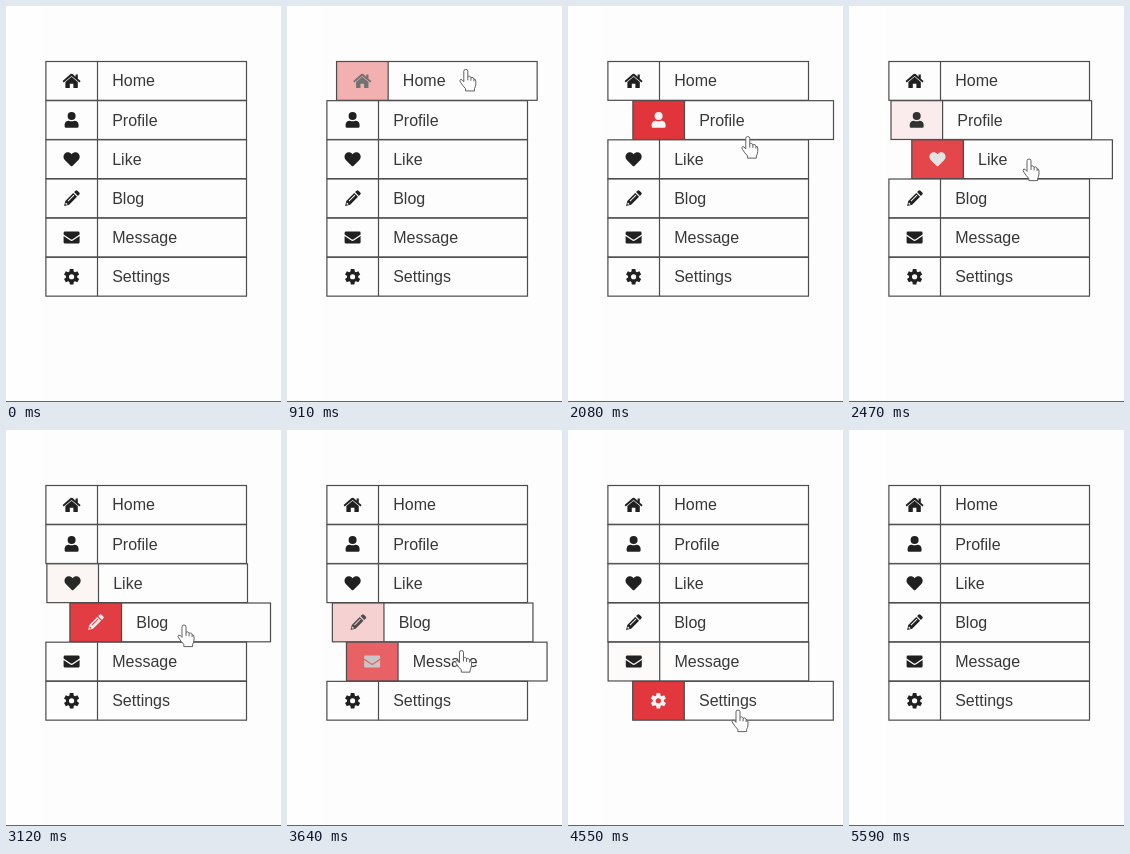
An HTML page with a canvas that plays this animation: 275 px wide and 396 px high, repeating every 6.5 s.

```html
<!DOCTYPE html>
<html lang="en">
<head>
<meta charset="utf-8">
<title>Hover menu</title>
<style>
  html, body { margin: 0; width: 100%; height: 100%; overflow: hidden; background: #fefefe; }
  canvas { display: block; width: 275px; height: 396px; }
</style>
</head>
<body>
<canvas id="stage"></canvas>
<script>
const W = 275, H = 396, LOOP = 6500, STEP = 130;
const PAPER = [252, 253, 252], RED = [225, 53, 59], DARK = [32, 32, 32], LIGHT = [245, 245, 245];
const ROW = { x: 39.9, y: 55.5, w: 200.6, h: 38.8, pitch: 39.17, split: 51.6, slide: 25 };
const FADE = 500;

const canvas = document.getElementById('stage');
const ctx = canvas.getContext('2d');
const dpr = window.devicePixelRatio || 1;
canvas.width = W * dpr;
canvas.height = H * dpr;

// Icons are centred on the origin, about 16 units across.
const icons = {
  home: new Path2D('M-9 .2L-1 -6.8Q0 -7.6 1 -6.8L4 -4.2V-6.5H6.2V-2.2L9 .2L7.9 1.6L0 -5L-7.9 1.6Z' +
    'M0 -4.2L6.2 1.1V6.6Q6.2 7.2 5.6 7.2H1.8V2.8H-1.8V7.2H-5.6Q-6.2 7.2 -6.2 6.6V1.1Z'),
  user: new Path2D('M0 -8A4 4 0 0 1 0 0A4 4 0 0 1 0 -8Z' +
    'M-2.8 .6Q0 1.6 2.8 .6Q7 .8 7 5V6.3Q7 7.8 5.5 7.8H-5.5Q-7 7.8 -7 6.3V5Q-7 .8 -2.8 .6Z'),
  heart: new Path2D('M0 -5C2 -7.4 5 -7.6 6.8 -5.8C8.6 -4 8.5 -1 6.8 .7L.8 6.8Q0 7.4 -.8 6.8' +
    'L-6.8 .7C-8.5 -1 -8.6 -4 -6.8 -5.8C-5 -7.6 -2 -7.4 0 -5Z'),
  pencil: new Path2D('M-10.6 0L-6.2 -2.7H5V2.7H-6.2ZM6.2 -2.7H8.2Q9.6 -2.7 9.6 -1.3V1.3Q9.6 2.7 8.2 2.7H6.2Z' +
    'M-4.5 -1.1V-.2H4V-1.1ZM-8.4 -.5V.7L-6.8 1.3V-1.1Z'),
  envelope: new Path2D('M-8 -3.2V-4.6Q-8 -6 -6.6 -6H6.6Q8 -6 8 -4.6V-3.2L1 1.6Q0 2.2 -1 1.6Z' +
    'M-8 -1.5L-1.3 3Q0 3.8 1.3 3L8 -1.5V4.6Q8 6 6.6 6H-6.6Q-8 6 -8 4.6Z'),
  cog: cogPath()
};

const rows = [
  { label: 'Home', icon: 'home', over: 790 },
  { label: 'Profile', icon: 'user', over: 1410 },
  { label: 'Like', icon: 'heart', over: 2145 },
  { label: 'Blog', icon: 'pencil', over: 2745 },
  { label: 'Message', icon: 'envelope', over: 3400 },
  { label: 'Settings', icon: 'cog', over: 4110 }
];
const LEAVE = 4800;

// Pointer tip: time, x, y
const track = [
  [520, 180, 8], [790, 179, 56], [1410, 178, 94], [1560, 178, 103],
  [2145, 180, 134], [2470, 180, 153], [2745, 179, 172], [3120, 178, 195],
  [3400, 176, 211], [4030, 172, 236], [4110, 172, 250], [4550, 170, 280],
  [4800, 170, 291], [5070, 171, 374], [5330, 172, 398]
];

const hand = new Path2D('M-2 1.8Q-2 0 0 0Q2 0 2 1.8V7.4Q2.8 6.6 3.9 7Q5 7.4 5.1 8.4' +
  'Q6.2 7.6 7.2 8.2Q8.1 8.7 8.1 9.8Q10 9.4 10 12V15Q9.8 17.5 8.6 19.4V21.6H-.2V19.4' +
  'Q-3.2 16.4 -5.2 13Q-6.6 11 -5.4 10.2Q-4 9.4 -2 12.4Z');
const knuckles = new Path2D('M2 7.4V11M5.1 8.4V11.4M8.1 9.8V12');
const arrow = new Path2D('M0 0V16L3.7 12.6L6.2 18.4L8.6 17.4L6.1 11.7H11.2Z');

function cogPath() {
  const p = new Path2D();
  for (let i = 0; i < 6; i++) {
    const a = i * Math.PI / 3 - Math.PI / 2;
    [[-.4, 5.6], [-.23, 7.9], [.23, 7.9], [.4, 5.6]].forEach(([d, r], k) => {
      const x = r * Math.cos(a + d), y = r * Math.sin(a + d);
      i + k ? p.lineTo(x, y) : p.moveTo(x, y);
    });
  }
  p.closePath();
  p.moveTo(2.6, 0);
  p.arc(0, 0, 2.6, 0, 2 * Math.PI);
  return p;
}

// CSS "ease": cubic-bezier(.25, .1, .25, 1)
function ease(x) {
  if (x <= 0) return 0;
  if (x >= 1) return 1;
  let lo = 0, hi = 1, s = .5;
  for (let i = 0; i < 20; i++) {
    s = (lo + hi) / 2;
    const at = .75 * s * (1 - s) + s * s * s;
    if (at < x) lo = s; else hi = s;
  }
  return .3 * s * (1 - s) * (1 - s) + 3 * s * s * (1 - s) + s * s * s;
}

const mix = (a, b, k) => a + (b - a) * k;
const rgb = (a, b, k) => `rgb(${a.map((v, i) => Math.round(mix(v, b[i], k))).join()})`;

function drawIcon(name, x, y, color) {
  ctx.save();
  ctx.translate(x, y);
  if (name === 'pencil') ctx.rotate(-Math.PI / 4);
  ctx.fillStyle = color;
  ctx.fill(icons[name], 'evenodd');
  ctx.restore();
}

function drawRow(row, i, t) {
  const out = i < rows.length - 1 ? rows[i + 1].over : LEAVE;
  const k = ease((t - row.over) / FADE) - ease((t - out) / FADE);
  const x = ROW.x + ROW.slide * k, y = ROW.y + ROW.pitch * i, mid = y + ROW.h / 2;

  ctx.fillStyle = rgb(PAPER, PAPER, 0);
  ctx.fillRect(x, y, ROW.w, ROW.h);
  ctx.fillStyle = rgb(PAPER, RED, k);
  ctx.fillRect(x, y, ROW.split, ROW.h);

  ctx.strokeStyle = '#4c4c4c';
  ctx.lineWidth = 1.2;
  ctx.strokeRect(x, y, ROW.w, ROW.h);
  ctx.beginPath();
  ctx.moveTo(x + ROW.split, y);
  ctx.lineTo(x + ROW.split, y + ROW.h);
  ctx.stroke();

  drawIcon(row.icon, x + 25.7, mid, rgb(DARK, LIGHT, k));
  ctx.fillStyle = '#383838';
  ctx.fillText(row.label, x + 66.3, mid + 5.5);
}

function drawPointer(t) {
  const n = track.findIndex(p => p[0] > t);
  if (n < 1) return;
  const [t0, x0, y0] = track[n - 1], [t1, x1, y1] = track[n];
  const k = (t - t0) / (t1 - t0);
  const onMenu = t >= rows[0].over && t < LEAVE;
  ctx.save();
  ctx.translate(mix(x0, x1, k), mix(y0, y1, k));
  ctx.lineJoin = 'round';
  ctx.lineWidth = 1;
  ctx.fillStyle = '#fff';
  ctx.strokeStyle = '#606060';
  const shape = onMenu ? hand : arrow;
  ctx.fill(shape);
  ctx.stroke(shape);
  if (onMenu) ctx.stroke(knuckles);
  ctx.restore();
}

function draw(t) {
  ctx.setTransform(dpr, 0, 0, dpr, 0, 0);
  ctx.fillStyle = '#fefefe';
  ctx.fillRect(0, 0, W, H);
  ctx.fillStyle = rgb(PAPER, PAPER, 0);
  ctx.fillRect(37, 0, W - 37, H);
  ctx.fillStyle = '#666';
  ctx.fillRect(0, H - 1, W, 1);
  ctx.font = '16px "Liberation Sans", Arial, sans-serif';
  ctx.textBaseline = 'alphabetic';
  rows.forEach((row, i) => drawRow(row, i, t));
  drawPointer(t);
}

const start = performance.now();
function tick() {
  const t = (performance.now() - start) % LOOP;
  draw(Math.floor(t / STEP) * STEP);
  requestAnimationFrame(tick);
}
tick();
</script>
</body>
</html>
```
